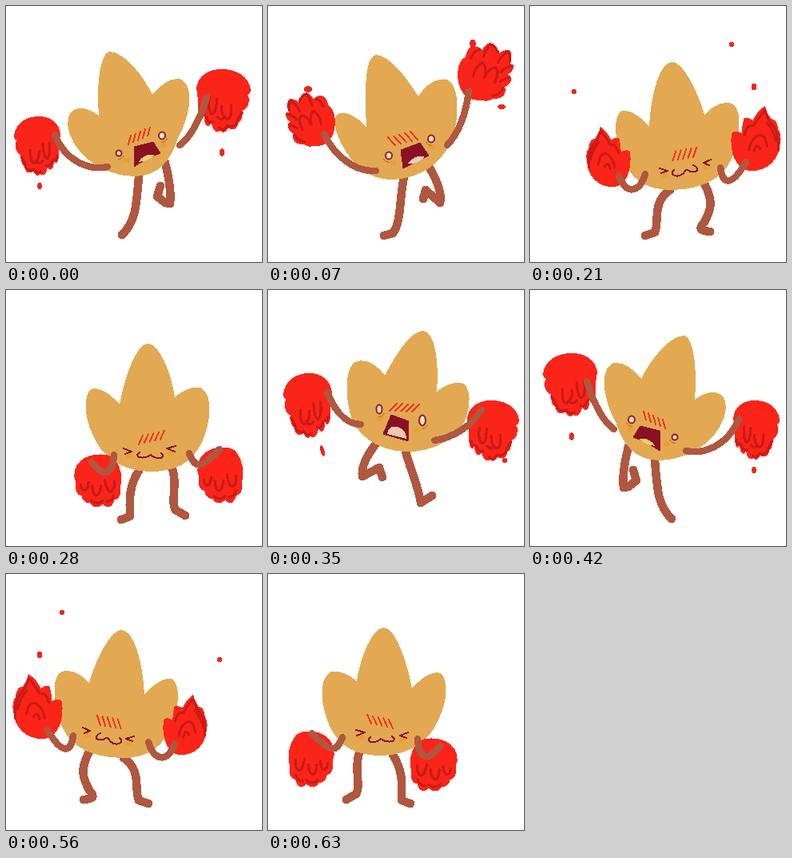
These frames come from a looping animation (320x320 px, 700 ms). An HTML page:

```html
<!DOCTYPE html>
<html lang="en">
<head>
<meta charset="utf-8">
<title>Cheering leaf</title>
<style>
html, body { margin: 0; width: 100%; height: 100%; overflow: hidden; background: #fff; }
svg { display: block; width: 100%; height: 100%; }
path { fill: none; stroke-linecap: round; stroke-linejoin: round; }
.body { fill: #e2a952; }
.limb { stroke: #b0573f; }
.pom { fill: #fb2419; }
.fold { stroke: #c91b17; stroke-width: 3.2; vector-effect: non-scaling-stroke; }
.drop { fill: #f3241c; }
.lines { stroke: #f0361f; stroke-width: 2; }
.ink { stroke: #8d1227; stroke-width: 2; }
.eye { fill: #fbe6cd; stroke: #971a26; stroke-width: 2; shape-rendering: geometricPrecision; }
.bag { stroke: #c8662f; stroke-width: 1.2; }
.mouth { fill: #8a1024; stroke: #951626; stroke-width: 1; }
.blush { fill: #e8a036; }
</style>
</head>
<body>
<svg viewBox="0 0 320 320" shape-rendering="crispEdges"><g id="dancer"></g></svg>
<script>
// Pom-pom shapes in a box from -50 to 50: [outline, folds]
const POMS = {
  droop: [
    'M-50 -18C-46 -38 -26 -50 4 -50C30 -50 48 -38 50 -20C46 -6 48 10 46 20C44 30 38 30 36 24C36 38 28 44 22 34C22 44 12 52 6 46C0 52 -6 46 -8 42C-18 46 -26 44 -26 34C-36 32 -34 20 -36 14C-46 12 -50 -4 -44 -10Q-50 -12 -50 -18Z',
    'M-34 18Q-26 26 -24 36Q-14 42 -8 38Q0 48 8 42M-14 6Q-16 28 -6 28Q4 24 4 8M-2 24Q4 32 12 24M12 -4Q14 20 22 20Q30 12 26 -6M20 32Q28 36 32 24M36 22Q42 26 42 16'],
  burst: [
    'M-50 -8Q-50 -14 -44 -14Q-50 -36 -40 -38Q-32 -38 -24 -32Q-20 -48 -8 -50Q0 -48 6 -38Q18 -48 28 -42Q34 -36 36 -26C52 -18 52 10 46 26C38 46 22 50 6 48Q-4 52 -12 46Q-32 46 -34 36Q-38 30 -34 26Q-46 20 -46 10Q-44 6 -40 4Q-48 0 -50 -8Z',
    'M-46 -10Q-34 -8 -28 0M-43 -18Q-46 -34 -38 -34Q-28 -28 -22 -16M-22 -34Q-16 -46 -8 -46Q0 -38 4 -26M10 -38Q20 -38 26 -24M-42 9Q-34 12 -26 16M-31 28Q-28 38 -12 41M-16 18Q-26 0 -18 -8Q-4 -6 2 10Q-2 -12 6 -16Q20 -8 22 8'],
  flame: [
    'M-18 -50Q-2 -42 6 -28Q20 -34 24 -30Q28 -20 28 -8Q42 -14 48 -8C54 20 40 48 14 50C-20 52 -46 34 -48 8Q-52 -6 -44 -14Q-42 -30 -30 -30Q-22 -38 -18 -50Z',
    'M-44 18Q-46 -8 -34 -20Q-22 -30 -17 -43Q-6 -34 4 -20Q18 -22 22 -6M-40 4Q-34 -14 -22 -24M-22 12Q-18 -10 -2 -4Q12 4 14 18M-8 16Q0 6 4 20'],
  rag: [
    'M-36 -36C-20 -50 20 -52 34 -40C50 -24 52 0 46 14C50 24 44 36 34 36C30 50 20 52 10 44C0 52 -12 50 -16 42C-28 42 -34 34 -34 28C-44 28 -50 16 -46 4C-54 -10 -48 -28 -36 -36Z',
    'M-36 8Q-34 20 -26 18Q-20 14 -20 4M-12 10Q-10 32 0 26Q6 20 6 10M14 0Q20 24 28 20Q36 14 34 2M-14 37Q0 46 10 37M18 39Q30 38 33 28']
};

// poms: [left, top, right, bottom, flipped]; lines: [x, y, step x, step y, dx, dy]
// eyes, blush and drops: [x, y, rx, ry, angle]
const POSES = {
  leap: {
    body: 'M146 107C160 80 178 52 193 51C209 51 214 90 211 127C223 117 238 113 246 118C256 130 251 155 243 170C228 192 200 203 170 202C135 200 108 180 102 152C97 130 96 98 109 90C123 84 138 95 146 107Z',
    legs: 'M135 192C125 205 116 220 118 233L139 222L143 234M172 202C178 225 188 245 191 266L205 257',
    arms: 'M116 168C100 168 85 155 74 128M208 188C235 184 255 168 267 150',
    pom: 'droop', poms: [[19, 104, 80, 186], [249, 138, 314, 215, true]],
    drops: [[68, 201, 2.5, 7, -15], [296, 213, 3, 3]],
    lines: [152, 151, 7, .3, 9, -9],
    eyes: [[139, 149, 3.5, 5.5], [193, 163, 4, 6.5]], blush: [[139, 161], [187, 175]],
    mouth: 'M154 156L176 164L175 189L144 180Z', tongue: 'M149 180Q151 169 161 171Q173 174 173 186Z', tongueColor: '#f3c7b4'
  },
  land: {
    body: 'M116 137C113 100 117 60 129 57C148 57 172 88 183 111C195 95 212 87 221 93C236 104 229 140 215 165C205 195 190 213 160 213C115 212 80 180 77 148C77 125 95 122 116 137Z',
    legs: 'M166 213C163 250 162 270 145 286M199 196C203 212 207 232 205 247L199 246L189 238L193 225',
    arms: 'M127 201C105 206 75 195 61 161M217 174C232 163 243 140 251 114',
    pom: 'droop', poms: [[10, 138, 68, 213], [238, 79, 306, 159, true]],
    drops: [[42, 225, 3, 4], [270, 183, 3, 5]],
    lines: [153, 173, 6, -2.6, 3, -11],
    eyes: [[141, 184, 3.5, 3.5], [195, 162, 4, 4.5]], blush: [[151, 193], [197, 174]],
    mouth: 'M160 176L184 170L193 184Q176 190 160 201Z', tongue: 'M166 195Q172 184 186 186Q180 193 166 195Z', tongueColor: '#f5cf72'
  },
  lift: {
    body: 'M134 113C150 88 170 62 187 61C202 63 201 110 199 151C212 137 228 129 236 136C244 150 230 175 219 190C205 210 185 217 165 217C130 215 100 195 90 160C83 135 83 98 98 92C112 89 126 99 134 113Z',
    legs: 'M119 204C110 220 104 235 107 246L125 230L128 241M152 214C158 240 155 270 166 284L177 287',
    arms: 'M98 174C85 160 75 140 71 106M187 206C215 208 240 185 252 160',
    pom: 'burst', poms: [[15, 46, 85, 119], [238, 108, 300, 176, true]],
    drops: [[66, 47, 4, 5], [30, 126, 5, 3], [272, 104, 5, 4]],
    lines: [135, 167, 7, 1.8, 9, -10],
    eyes: [[118, 166, 4, 4.5], [171, 187, 4, 4.5]], blush: [[117, 176], [165, 196]],
    mouth: 'M132 171L156 180L153 203L121 187Z', tongue: 'M126 189Q136 184 148 197Q138 199 126 189Z', tongueColor: '#f3cdb5'
  },
  settle: {
    body: 'M136 150C134 120 138 70 152 66C172 66 196 100 203 121C215 106 232 99 240 104C252 115 250 150 238 180C225 208 205 222 180 222C142 220 109 189 102 153C100 133 118 133 136 150Z',
    legs: 'M174 223C156 239 164 262 156 281L144 287M211 212C220 225 224 235 223 245L208 238L204 249',
    arms: 'M144 210C120 210 102 194 92 167M234 184C250 170 259 150 260 124',
    pom: 'burst', poms: [[36, 113, 102, 180], [239, 49, 306, 131, true]],
    drops: [[43, 93, 3, 2.5], [265, 34, 4, 3], [304, 115, 4, 4]],
    lines: [169, 180, 6.2, -3, 2, -12],
    eyes: [[157, 190, 3.5, 5.5, -40], [211, 171, 4, 5.5, -40]], blush: [[166, 198], [213, 182]],
    mouth: 'M174 183L198 177L211 201L178 214Z', tongue: 'M185 209Q190 200 207 202Q199 209 185 209Z', tongueColor: '#f3cdb5'
  },
  toss: {
    body: 'M104 136C111 110 130 70 144 70C160 70 171 110 173 150C184 138 200 127 209 132C219 142 215 170 208 185C198 215 180 230 145 230C100 229 75 212 66 180C58 155 58 126 70 122C82 118 95 126 104 136Z',
    legs: 'M104 222C92 245 96 255 104 270C111 278 111 281 97 282M147 230C170 245 160 270 166 283L178 287',
    arms: 'M84 202C82 220 72 230 52 195M178 210C183 230 200 240 211 212',
    pom: 'flame', poms: [[8, 125, 71, 206], [196, 151, 252, 226, true]],
    drops: [[70, 48, 3, 3], [42, 101, 3.5, 4], [267, 107, 3, 3]],
    lines: [114, 177, 6.4, 1.1, 4, 12],
    blush: [[102, 202], [153, 212]],
    smile: 'M96 192L105 196L98 199M160 203L150 206L158 209M118 199Q112 201 113 206Q120 209 125 205Q129 205 130 209Q137 215 143 211Q146 208 142 205'
  },
  squat: {
    body: 'M142 143C148 110 163 67 177 67C192 67 207 105 211 134C222 124 237 119 245 123C259 133 256 165 245 190C232 218 210 227 180 227C140 226 118 205 108 180C98 160 96 130 107 124C118 120 132 132 142 143Z',
    legs: 'M166 226C150 250 156 275 155 283L144 287M206 218C216 240 205 265 212 275L224 282',
    arms: 'M135 206C134 225 126 240 107 215M229 204C236 220 240 228 267 199',
    pom: 'rag', poms: [[85, 204, 145, 272], [239, 195, 297, 267]],
    drops: [],
    lines: [166, 193, 6.7, -1.5, 5, -11],
    blush: [[154, 208], [206, 204]],
    smile: 'M147 198L157 202L149 205M212 195L201 198L211 202M167 203Q162 206 166 209Q174 211 181 206Q186 211 194 210Q199 207 194 204'
  }
};

const STEP = 70;
// A leading minus mirrors the pose.
const SEQUENCE = ['land', '-lift', 'settle', '-toss', 'squat', 'leap', '-land', 'lift', 'toss', '-squat'];

const path = (cls, d, extra = '') => `<path class="${cls}" d="${d}" ${extra}/>`;
const oval = (cls, [x, y, rx = 4.5, ry = 3, angle = 0]) =>
  `<ellipse class="${cls}" cx="${x}" cy="${y}" rx="${rx}" ry="${ry}" transform="rotate(${angle} ${x} ${y})"/>`;
const ovals = (cls, list) => list.map(o => oval(cls, o)).join('');

function drawPom(kind, [left, top, right, bottom, flipped]) {
  const sx = (right - left) / 100 * (flipped ? -1 : 1);
  const sy = (bottom - top) / 100;
  const [outline, folds] = POMS[kind];
  return `<g transform="translate(${(left + right) / 2} ${(top + bottom) / 2}) scale(${sx} ${sy})">` +
    path('pom', outline) + path('fold', folds) + '</g>';
}

function drawLines([x, y, stepX, stepY, dx, dy]) {
  const strokes = [0, 1, 2, 3, 4].map(i => `M${x + i * stepX} ${y + i * stepY}l${dx} ${dy}`);
  return path('lines', strokes.join(''));
}

function drawShock(p) {
  const bags = p.eyes.map(([x, y, , ry]) => `M${x} ${y + ry + 4}q5 -1 6 -4`).join('');
  return path('bag', bags) + ovals('eye', p.eyes) + path('mouth', p.mouth) +
    path('tongue', p.tongue, `style="fill:${p.tongueColor}"`);
}

function drawFace(p) {
  return ovals('blush', p.blush) + drawLines(p.lines) + (p.smile ? path('ink', p.smile) : drawShock(p));
}

function drawPose(name) {
  const mirrored = name[0] === '-';
  const p = POSES[name.replace('-', '')];
  return `<g transform="${mirrored ? 'translate(322 0) scale(-1 1)' : ''}">` +
    path('limb', p.legs, 'stroke-width="10.5"') +
    path('body', p.body) +
    p.poms.map(box => drawPom(p.pom, box)).join('') +
    path('limb', p.arms, 'stroke-width="8.5"') +
    drawFace(p) + ovals('drop', p.drops) + '</g>';
}

const dancer = document.getElementById('dancer');
const drawings = SEQUENCE.map(drawPose);
let shown = -1;

function render(time) {
  const index = Math.floor(time / STEP) % drawings.length;
  if (index !== shown) dancer.innerHTML = drawings[shown = index];
}

const start = performance.now();
function tick() {
  render(performance.now() - start);
  requestAnimationFrame(tick);
}
tick();
</script>
</body>
</html>
```
